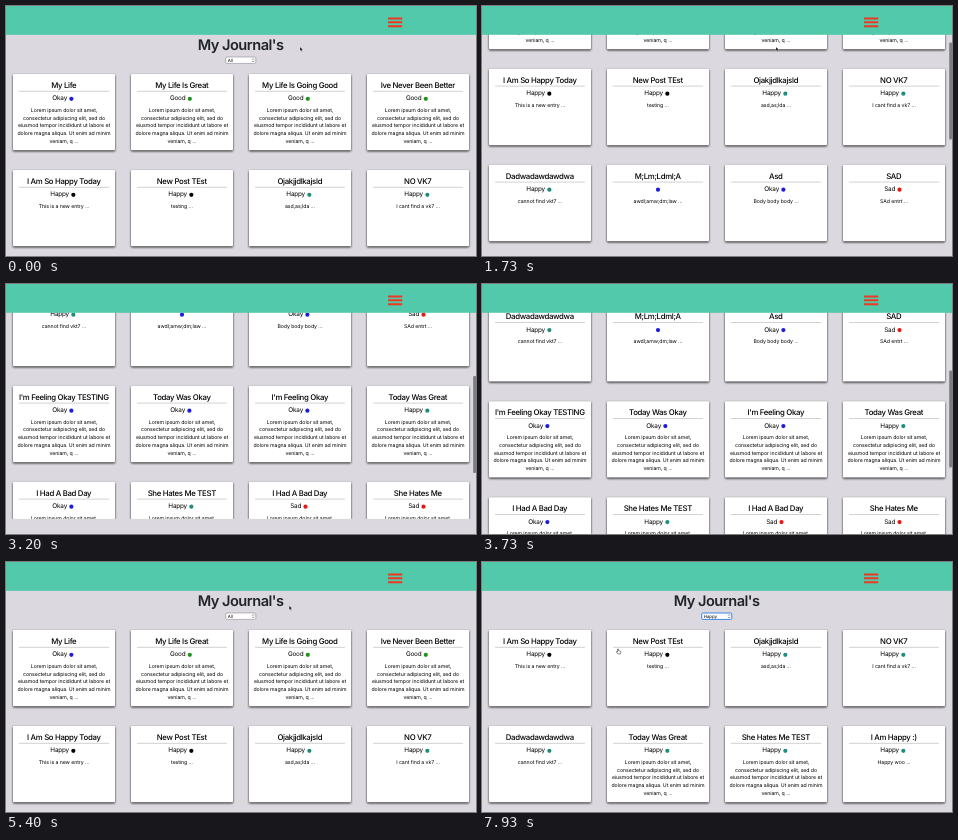
An HTML page for the animation above (8 s loop, 470x250 px).

```html
<!DOCTYPE html>
<html lang="en">
<head>
<meta charset="utf-8">
<title>My Journal's</title>
<style>
  html, body { margin: 0; width: 100%; height: 100%; overflow: hidden; background: #dbd8df; }
  svg { display: block; width: 470px; height: 250px; }
  text { font-family: Inter, "Open Sans", sans-serif; fill: #000; text-rendering: geometricPrecision; }
  .mid { text-anchor: middle; }
  .heading { font-size: 14.6px; font-weight: 600; letter-spacing: -.5px; fill: #212529; }
  .name { font-size: 7.8px; font-weight: 500; letter-spacing: -.32px; }
  .mood { font-size: 6.4px; letter-spacing: -.19px; }
  .body { font-size: 5.2px; letter-spacing: -.06px; }
  .choice { font-size: 4.4px; letter-spacing: -.1px; }
  .card { fill: #fff; filter: drop-shadow(0 1px .8px rgba(0, 0, 0, .88)); }
</style>
</head>
<body>
<svg id="stage" viewBox="0 0 470 250">
  <rect width="470" height="250" fill="#dbd8df"/>
  <g id="page">
    <text class="heading mid" x="234.6" y="43.8">My Journal's</text>
    <rect id="select" x="219.8" y="51" width="30" height="6.4" rx="1" fill="#fff"/>
    <text id="choice" class="choice" x="221.8" y="55.8"></text>
    <path d="M246.1 53.7l1.1-1.2 1.1 1.2M246.1 54.8l1.1 1.2 1.1-1.2" fill="none" stroke="#333" stroke-width=".5"/>
    <g id="all"></g>
    <g id="happy"></g>
    <rect id="unpainted" y="489" width="470" height="300" fill="#dbd8df"/>
  </g>
  <g id="header">
    <rect y="-20" width="470" height="20" fill="#f1f0f3"/>
    <rect width="470" height="28.8" fill="#51c9aa"/>
    <path d="M382 12.4h14.2M382 16.3h14.2M382 20.2h14.2" stroke="#ee3822" stroke-width="2"/>
  </g>
  <rect id="thumb" x="467.2" width="2.8" height="97" rx="1" fill="#7d7b82"/>
  <path id="arrow" d="M0 0v4l1-.9.7 1.5.7-.3-.7-1.5h1.3z" fill="#111" stroke="#fff" stroke-width=".25"/>
  <path id="hand" d="M-.5 0q.5-.6 1 0v1.6l1.9.5q.5.2.4.8l-.4 2H-.2L-1.7 2.9q.1-.7.8-.2l.4.3z" fill="#fff" stroke="#222" stroke-width=".5"/>
</svg>
<script>
const LOOP = 8000;
const $ = id => document.getElementById(id);

const BLUE = '#1c1ce0', GREEN = '#1a961a', BLACK = '#000', TEAL = '#1b8f7d', RED = '#ea1515';
const LOREM = ['Lorem ipsum dolor sit amet,', 'consectetur adipiscing elit, sed do',
  'eiusmod tempor incididunt ut labore et', 'dolore magna aliqua. Ut enim ad minim', 'veniam, q ...'];

// title, mood, dot colour, body lines
const posts = [
  ['My Life', 'Okay', BLUE, LOREM],
  ['My Life Is Great', 'Good', GREEN, LOREM],
  ['My Life Is Going Good', 'Good', GREEN, LOREM],
  ['Ive Never Been Better', 'Good', GREEN, LOREM],
  ['I Am So Happy Today', 'Happy', BLACK, ['This is a new entry ...']],
  ['New Post TEst', 'Happy', BLACK, ['testing ...']],
  ['Ojakjjdlkajsld', 'Happy', TEAL, ['asd,as;lda ...']],
  ['NO VK7', 'Happy', TEAL, ['I cant find a vk7 ...']],
  ['Dadwadawdawdwa', 'Happy', TEAL, ['cannot find vkt7 ...']],
  ['M;Lm;Ldml;A', '', BLUE, ['awdl;amw;dm;law ...']],
  ['Asd', 'Okay', BLUE, ['Body body body ...']],
  ['SAD', 'Sad', RED, ['SAd entrt ...']],
  ["I'm Feeling Okay TESTING", 'Okay', BLUE, LOREM],
  ['Today Was Okay', 'Okay', BLUE, LOREM],
  ["I'm Feeling Okay", 'Okay', BLUE, LOREM],
  ['Today Was Great', 'Happy', TEAL, LOREM],
  ['I Had A Bad Day', 'Okay', BLUE, LOREM],
  ['She Hates Me TEST', 'Happy', TEAL, LOREM],
  ['I Had A Bad Day', 'Sad', RED, LOREM],
  ['She Hates Me', 'Sad', RED, LOREM],
  ['I Am Happy :)', 'Happy', TEAL, ['Happy woo ...']]
];

function add(parent, tag, attrs, text) {
  const el = document.createElementNS('http://www.w3.org/2000/svg', tag);
  for (const key in attrs) el.setAttribute(key, attrs[key]);
  if (text) el.textContent = text;
  parent.appendChild(el);
  return el;
}

function addCard(parent, [title, mood, color, lines], i) {
  const g = add(parent, 'g', {
    transform: `translate(${7 + 118 * (i % 4)} ${68 + 96 * Math.floor(i / 4)})`
  });
  add(g, 'rect', { class: 'card', width: 102, height: 76.3, rx: 1 });
  add(g, 'text', { class: 'name mid', x: 50.8, y: 13.9 }, title);
  add(g, 'rect', { x: 6, y: 16.9, width: 90, height: .6, fill: '#b4b4b8' });
  const label = add(g, 'text', { class: 'mood', y: 26.4 }, mood);
  const width = mood ? label.getComputedTextLength() : 0;
  const left = 51 - (width + 8.6) / 2;
  label.setAttribute('x', left);
  add(g, 'circle', { cx: left + width + 4.3, cy: 24.8, r: 2.1, fill: color });
  lines.forEach((line, n) =>
    add(g, 'text', { class: 'body mid', x: 51, y: 37.9 + 7.72 * n }, line));
}

posts.forEach((post, i) => addCard($('all'), post, i));
posts.filter(post => post[1] === 'Happy').forEach((post, i) => addCard($('happy'), post, i));

const scrollKeys = [[900, 0], [1730, 101], [2400, 214], [3000, 229], [3200, 254], [3420, 290],
  [3560, 290], [4170, 0], [4240, -5], [4330, -2.6], [4500, 0]];

// Monotone cubic curve through the keys
function curve(keys, t) {
  const last = keys.length - 1;
  if (t <= keys[0][0]) return keys[0][1];
  if (t >= keys[last][0]) return keys[last][1];
  const slope = i => (keys[i + 1][1] - keys[i][1]) / (keys[i + 1][0] - keys[i][0]);
  const tangent = i => {
    if (i === 0 || i === last) return 0;
    const a = slope(i - 1), b = slope(i);
    return a * b <= 0 ? 0 : 2 * a * b / (a + b);
  };
  const i = keys.findIndex(key => key[0] > t) - 1;
  const [t0, y0] = keys[i], [t1, y1] = keys[i + 1];
  const h = t1 - t0, u = (t - t0) / h, v = 1 - u;
  return y0 * (1 + 2 * u) * v * v + tangent(i) * h * u * v * v
    + y1 * u * u * (3 - 2 * u) - tangent(i + 1) * h * u * u * v;
}

const clamp = x => Math.min(1, Math.max(0, x));
const ease = (t, from, to) => {
  const u = clamp((t - from) / (to - from));
  return u * u * (3 - 2 * u);
};
const show = (el, on) => el.setAttribute('visibility', on ? 'visible' : 'hidden');
const move = (el, x, y) => el.setAttribute('transform', `translate(${x} ${y})`);

function draw(t) {
  const scroll = curve(scrollKeys, t);
  move($('page'), 0, -scroll);
  move($('header'), 0, Math.max(0, -scroll));
  show($('unpainted'), t < 3270);

  $('thumb').setAttribute('y', Math.max(0, scroll * .362));
  $('thumb').setAttribute('opacity', clamp((t - 870) / 60) * (1 - clamp((t - 5150) / 250)));

  const filtered = t >= 7330, focused = t >= 6900;
  $('all').setAttribute('display', filtered ? 'none' : 'inline');
  $('happy').setAttribute('display', filtered ? 'inline' : 'none');
  $('choice').textContent = filtered ? 'Happy' : 'All';
  $('select').setAttribute('stroke', focused ? '#3c86e0' : '#77757c');
  $('select').setAttribute('stroke-width', focused ? 1 : .5);

  const reach = ease(t, 5260, 5780), leave = ease(t, 7400, 7900);
  const x = 294 - 60 * reach - 98 * leave;
  const y = 41 + 15.5 * reach + 30.5 * leave;
  const onSelect = t >= 5700;
  show($('arrow'), t < 2000 || (t >= 5260 && !onSelect));
  show($('hand'), onSelect);
  move($('arrow'), x, y);
  move($('hand'), x, y);
}

const start = performance.now();
function tick() {
  draw((performance.now() - start) % LOOP);
  requestAnimationFrame(tick);
}
tick();
</script>
</body>
</html>
```
